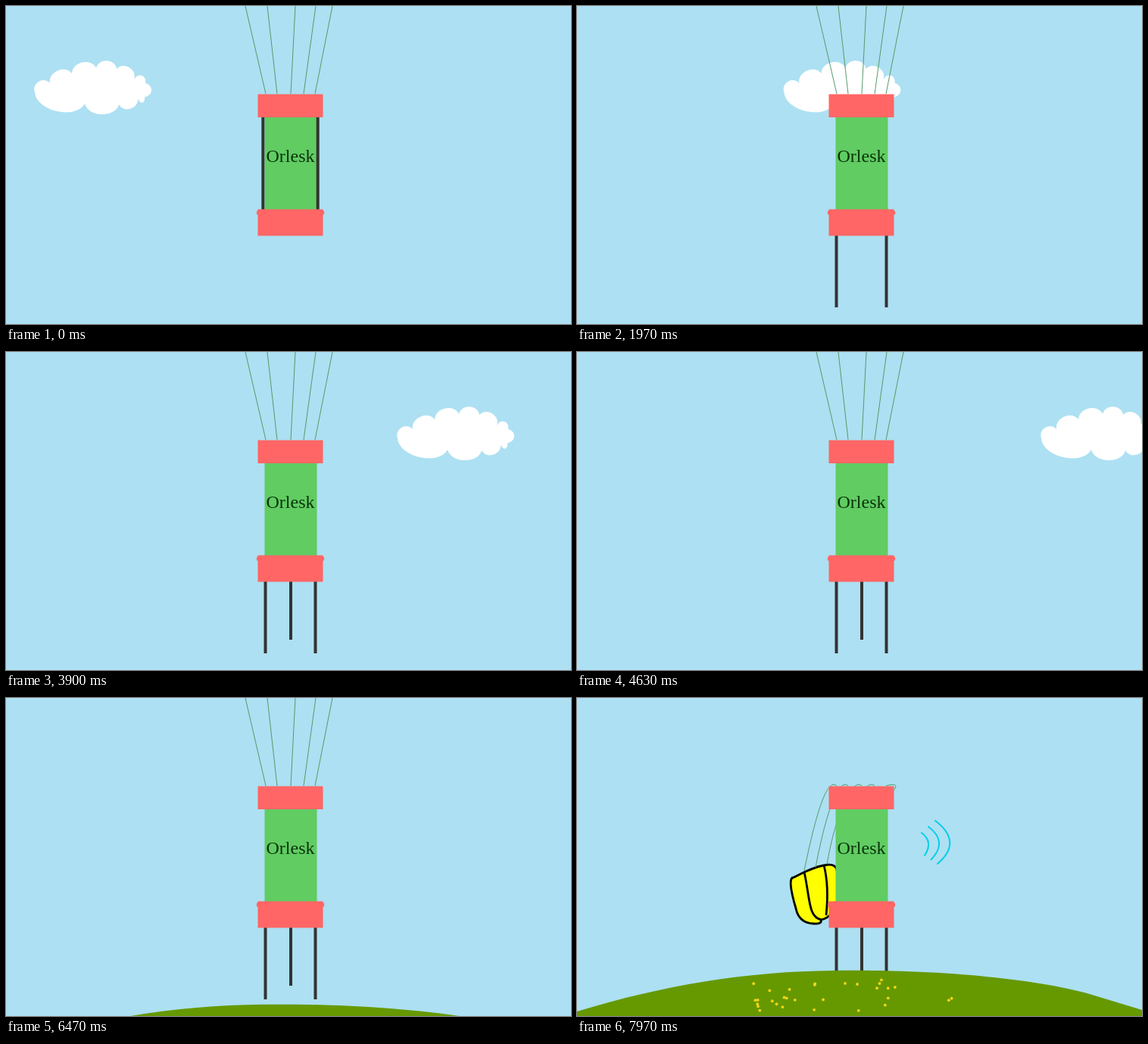
An HTML page with a canvas that plays this animation: 746x420 px, repeating every 8000 ms.

```html
<!DOCTYPE html>
<html lang="en">
<head>
<meta charset="utf-8">
<title>Capsule landing</title>
<style>
  html, body { margin: 0; width: 100%; height: 100%; overflow: hidden; background: #ade0f2; }
  canvas { display: block; }
</style>
</head>
<body>
<canvas id="stage" width="746" height="420"></canvas>
<script>
const ctx = document.getElementById('stage').getContext('2d');
const W = 746, H = 420, LOOP = 8000, CENTER = 375.5;
const SKY = '#ade0f2', RED = '#ff6665', GREEN = '#60cc62', LEG = '#333333', CORD = '#55996a';

const lerp = (a, b, p) => a + (b - a) * p;
const ease = p => p * p * (3 - 2 * p);
const span = (t, from, to) => Math.min(1, Math.max(0, (t - from) / (to - from)));

function seeded(seed) {
  return () => (seed = seed * 16807 % 2147483647) / 2147483647;
}

// Closed outline with a rounded bump between each pair of neighbouring points.
function scallops(points) {
  const path = new Path2D();
  path.moveTo(...points[0]);
  points.forEach(([x, y], i) => {
    const [x2, y2] = points[(i + 1) % points.length];
    const dx = x2 - x, dy = y2 - y, chord = Math.hypot(dx, dy);
    const lift = (5 + 0.19 * chord) * 4 / 3 / chord;
    const nx = dy * lift, ny = -dx * lift;
    path.bezierCurveTo(x + dx * 0.1 + nx, y + dy * 0.1 + ny,
      x2 - dx * 0.1 + nx, y2 - dy * 0.1 + ny, x2, y2);
  });
  return path;
}

const cloud = scallops([[38, 114], [58, 102], [87, 89], [119, 82], [146, 83], [169, 97],
  [184, 102], [183, 120], [174, 122], [149, 130], [104, 129]]);
const hill = new Path2D('M0 414C115 379 225 361 340 360C480 358 620 372 690 395L746 412V500H0Z');
const canopy = new Path2D(
  'M300 230Q340 212 343 227Q352 286 322 293Q324 299 312 298Q293 297 289 278Q277 237 286 237Z');
const seams = new Path2D('M300 230C308 265 305 290 323 293M326 221Q333 248 329 287');

const rnd = seeded(77);
const seeds = Array.from({ length: 30 }, () => [lerp(233, 495, rnd()), lerp(372, 413, rnd())]);

// Each cord: x at the stage top, x on the lid, sideways lean once slack.
const cords = [[316, 343, -14], [345, 358, -14], [382, 376, -14], [409, 393, -14], [431, 408, 45]];

function rect(color, x, y, w, h) {
  ctx.fillStyle = color;
  ctx.fillRect(x, y, w, h);
}

function dot(color, x, y, r) {
  ctx.fillStyle = color;
  ctx.beginPath();
  ctx.arc(x, y, r, 0, Math.PI * 2);
  ctx.fill();
}

function pen(color, width) {
  ctx.strokeStyle = color;
  ctx.lineWidth = width;
  ctx.beginPath();
}

function shifted(x, y, paint) {
  ctx.save();
  ctx.translate(x, y);
  paint();
  ctx.restore();
}

function drawCloud(t) {
  // A steady drift that gets a little faster past the capsule.
  const x = 0.1195 * t + 0.012 * Math.max(0, t - 2820);
  shifted(x, 0, () => {
    ctx.fillStyle = '#ffffff';
    ctx.fill(cloud);
  });
}

function drawCords(p) {
  const reach = 226;
  cords.forEach(([top, lid, lean], i) => {
    const slope = (top - lid) / 116;
    const slack = [[lid + lean, 104], [314 + 13 * i, 160], [300 + 15 * i, 228 - 4 * i]];
    const curve = slack.flatMap(([x, y], k) => {
      const rise = reach * (k + 1) / 3;
      return [lerp(lid + slope * rise, x, p), lerp(116 - rise, y, p)];
    });
    pen(CORD, 1);
    ctx.moveTo(lid, 116);
    ctx.bezierCurveTo(...curve);
    ctx.stroke();
  });
}

function drawCanopy(p) {
  if (p === 0) return;
  shifted(60 * (1 - p), -338 * (1 - p), () => {
    ctx.fillStyle = '#ffff00';
    ctx.fill(canopy);
    pen('#000000', 2.8);
    ctx.lineJoin = 'round';
    ctx.stroke(canopy);
    ctx.stroke(seams);
  });
}

function drawLegs(t) {
  const turn = span(t, 1067, 1567), a = turn * Math.PI;
  const length = 134 - 17 * span(t, 1567, 1667);
  const gap = lerp(36.2, 33, turn) - 7 * Math.sin(a);
  for (const side of [-1, 1]) {
    const x = CENTER + side * gap;
    pen(LEG, 4);
    ctx.moveTo(x, 281);
    ctx.lineTo(x + side * length * Math.sin(a), 281 - length * Math.cos(a));
    ctx.stroke();
  }
  rect(LEG, 374, 300, 4, 80 * span(t, 2000, 2470));
}

function drawCapsule(t) {
  rect(GREEN, 341.5, 146, 69, 124);
  drawLegs(t);
  for (const [y, h] of [[116.5, 30.5], [268.5, 35]]) rect(RED, 332.5, y, 86, h);
  for (const x of [334, 417]) dot(RED, x, 273, 3.2);
  ctx.fillStyle = '#0a330a';
  ctx.font = '24px "Liberation Serif", serif';
  ctx.textAlign = 'center';
  ctx.fillText('Orlesk', CENTER, 206);
}

function drawHill(t) {
  const rise = span(t, 6060, 7690);
  if (rise === 0) return;
  const sown = Math.round(seeds.length * span(t, 7530, 7900));
  shifted(0, 60 * (1 - rise), () => {
    ctx.fillStyle = '#669900';
    ctx.fill(hill);
    for (const [x, y] of seeds.slice(0, sown)) dot('#f2d41a', x, y, 1.9);
  });
}

function drawWaves(t) {
  ctx.lineCap = 'round';
  for (let i = 0; i < 3 && t >= 7730 + i * 70; i++) {
    pen('#00cfe8', 2);
    ctx.moveTo(455 + 9 * i, 178 - 8 * i);
    ctx.quadraticCurveTo(471 + 19.5 * i, 190, 459 + 8.5 * i, 208 + 5.5 * i);
    ctx.stroke();
  }
  ctx.lineCap = 'butt';
}

function draw(t) {
  const fall = ease(span(t, 6900, 7650));
  rect(SKY, 0, 0, W, H);
  drawCloud(t);
  drawCanopy(fall);
  drawCords(fall);
  drawCapsule(t);
  drawHill(t);
  drawWaves(t);
}

const start = performance.now();
function frame() {
  draw((performance.now() - start) % LOOP);
  requestAnimationFrame(frame);
}
frame();
</script>
</body>
</html>
```
